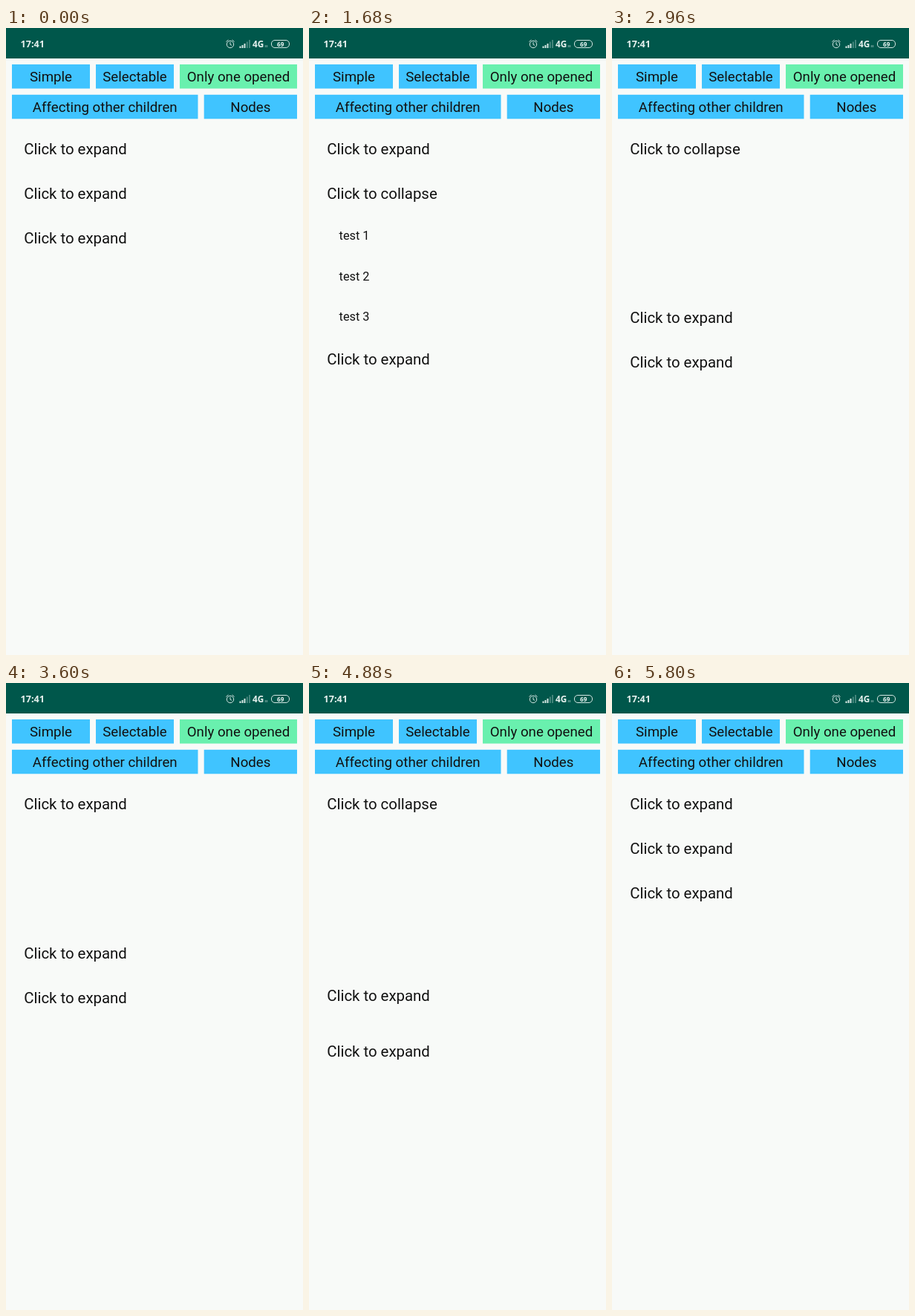
Write an HTML page that moves like this. It is 400 px wide and 844 px high and loops after 7.04 s.

```html
<!DOCTYPE html>
<html lang="en">
<head>
<meta charset="utf-8">
<title>Accordion: only one opened</title>
<style>
  html, body { margin: 0; width: 100%; height: 100%; overflow: hidden; background: #f8faf8; }
  svg { display: block; width: 400px; height: 844px; font-family: Roboto, sans-serif; fill: #111; }
  .status { font-family: "Open Sans", sans-serif; font-weight: 700; fill: #e6f1ee; }
  .line { fill: none; stroke: #d5e6e2; }
  .button { font-size: 18.7px; text-anchor: middle; }
  .header { font-size: 20.4px; }
  .child { font-size: 16.3px; }
</style>
</head>
<body>
<svg id="stage" viewBox="0 0 400 844">
  <rect width="400" height="41" fill="#00574b"/>
  <g class="status">
    <text x="19.5" y="26" font-size="12.6">17:41</text>
    <text x="332" y="26" font-size="11.8">4G</text>
    <text x="369.7" y="24.8" font-size="8.2" text-anchor="middle">69</text>
  </g>
  <g class="line">
    <circle cx="302" cy="22" r="4.7"/>
    <path d="M302 19v3.2l2 1.2M296.5 18.5l3-2.5M307.5 18.5l-3-2.5"/>
    <rect x="357.5" y="16.5" width="24" height="10" rx="4.5"/>
    <path d="M315.5 27v-2.5M318.5 27v-4M321.5 27v-6" stroke-width="2"/>
    <path d="M324.8 27v-8.5M328 27v-11M349.5 26v-3M351.5 26v-3" stroke-width="1.6" opacity=".4"/>
  </g>
</svg>
<script>
const LOOP = 7040, MOVE = 250, FADE_IN = 180, FADE_OUT = 100, LABEL_LAG = 290;
const ROW = 60, CHILD_ROW = 54.45;
const childCounts = [4, 3, 2];

// at: tap time, move: start of the height change, open: item opened (-1 for none)
const taps = [
  { at: 160, move: 210, open: 0 },
  { at: 1080, move: 1240, open: 1 },
  { at: 2040, move: 2165, open: 2 },
  { at: 2660, move: 2790, open: 0 },
  { at: 3400, move: 3500, open: -1 },
  { at: 4120, move: 4140, open: 1 },
  { at: 4560, move: 4676, open: 0 },
  { at: 5440, move: 5550, open: -1 }
];

const stage = document.getElementById("stage");

function add(parent, tag, attrs, text = "") {
  const node = document.createElementNS("http://www.w3.org/2000/svg", tag);
  for (const name in attrs) node.setAttribute(name, attrs[name]);
  node.textContent = text;
  return parent.appendChild(node);
}

function addButton(label, x, y, width, fill = "#40c4ff") {
  add(stage, "rect", { x, y, width, height: 32.5, fill });
  add(stage, "text", { class: "button", x: x + width / 2, y: y + 23.4 }, label);
}

addButton("Simple", 8, 49, 105);
addButton("Selectable", 121, 49, 105);
addButton("Only one opened", 234, 49, 158, "#69f0ae");
addButton("Affecting other children", 8, 89.8, 250.5);
addButton("Nodes", 266.7, 89.8, 125.3);

const items = childCounts.map(count => {
  const group = add(stage, "g", {});
  const label = add(group, "text", { class: "header", x: 24.2 });
  const list = add(group, "g", { class: "child" });
  for (let n = 0; n < count; n++)
    add(list, "text", { x: 40.6, y: 55.3 + n * CHILD_ROW }, `test ${n + 1}`);
  return { group, label, list, height: count * CHILD_ROW };
});

// Symmetric ease-in-out, clamped to 0..1
function ease(u) {
  u = Math.min(1, Math.max(0, u));
  return u < 0.5 ? (2 * u) ** 1.68 / 2 : 1 - (2 - 2 * u) ** 1.68 / 2;
}

function itemState(index, t) {
  let extent = 0, opacity = 0, opened = false;
  taps.forEach((tap, k) => {
    if (tap.open !== index) return;
    const next = taps[k + 1];
    const labelEnd = next.at + (next.open < 0 ? 0 : LABEL_LAG);
    extent += ease((t - tap.move) / MOVE) - ease((t - next.move) / MOVE);
    opacity += ease((t - tap.move - MOVE) / FADE_IN) - ease((t - next.at) / FADE_OUT);
    opened ||= t >= tap.at && t < labelEnd;
  });
  return { extent, opacity: Math.max(0, opacity), opened };
}

function draw(now) {
  const t = now % LOOP;
  let y = 169.8;
  items.forEach((item, i) => {
    const { extent, opacity, opened } = itemState(i, t);
    item.group.setAttribute("transform", `translate(0 ${y.toFixed(2)})`);
    item.label.textContent = opened ? "Click to collapse" : "Click to expand";
    item.list.setAttribute("opacity", opacity.toFixed(3));
    y += ROW + extent * item.height;
  });
}

const start = performance.now();
function tick() {
  draw(performance.now() - start);
  requestAnimationFrame(tick);
}
tick();
</script>
</body>
</html>
```
